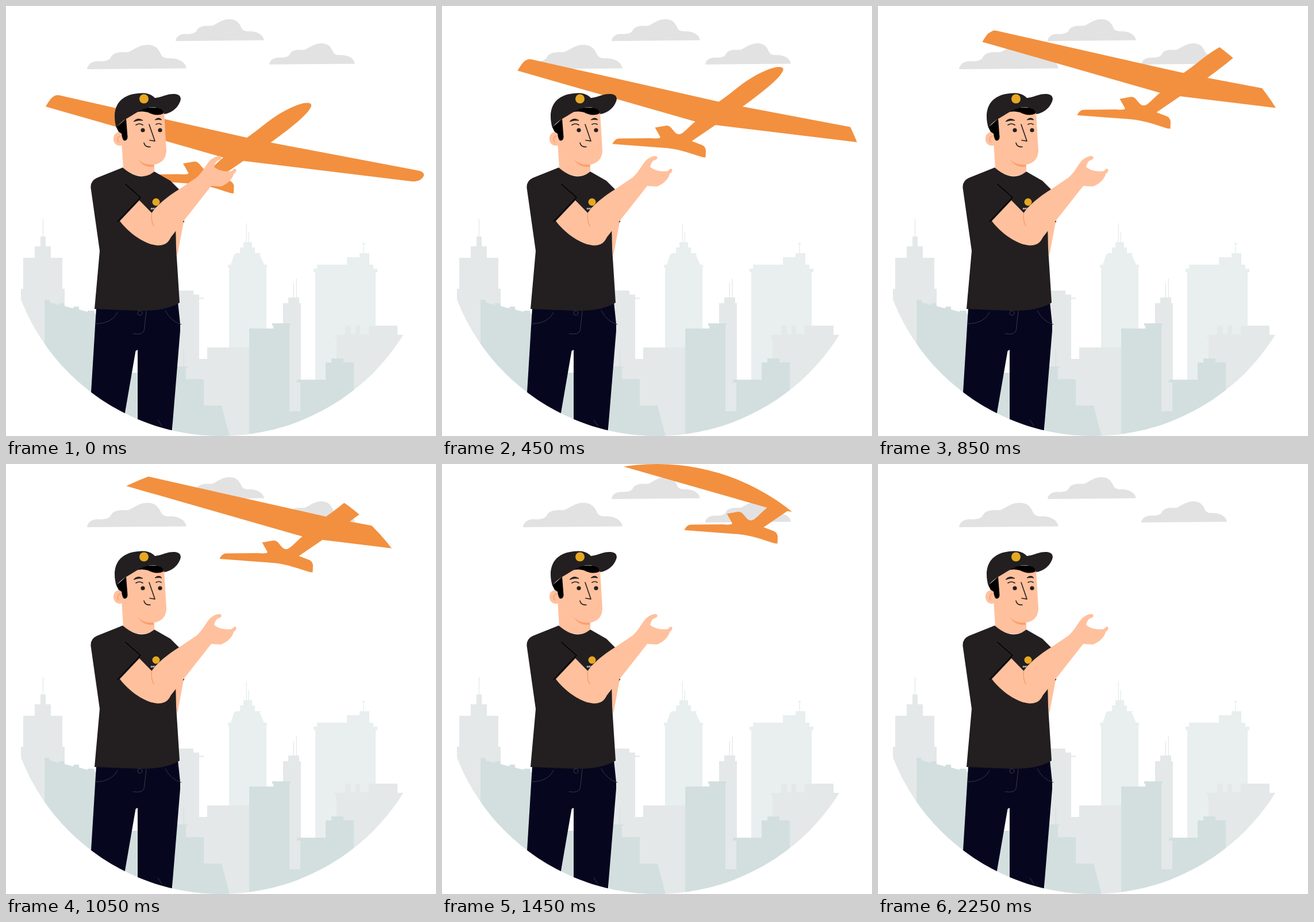
Animation, 748 px wide and 748 px high, one loop 2310 ms. Source, as an HTML page:

```html
<!DOCTYPE html>
<html lang="en">
<head>
<meta charset="utf-8">
<title>Glider launch</title>
<style>
  html, body { margin: 0; width: 100%; height: 100%; overflow: hidden; background: #fff; }
  svg { display: block; width: 100%; height: 100%; }
  .line { fill: none; stroke-linecap: round; stroke-linejoin: round; }
  .light { fill: #e8efee; }
  .mid { fill: #e4e8e8; }
  .dark { fill: #d3dfdf; }
  .cloth { fill: #231f20; }
  .skin { fill: #ffc09d; }
  .shade { fill: #fb9f6e; }
  .gold { fill: #e5a823; }
</style>
</head>
<body>
<svg viewBox="0 0 748 748" xmlns="http://www.w3.org/2000/svg">
  <defs>
    <clipPath id="stage"><circle cx="374" cy="374" r="374"/></clipPath>
    <path id="cloud" d="M141 110C142 101 149 97 158 96C171 97 181 95 183 88C190 78 203 81 213 80C222 77 230 68 245 67.5C261 67 266 76 270 85C273 90 278 91 285 91C300 91 312 97 314 108.500Z"/>
  </defs>
  <g clip-path="url(#stage)">
    <g fill="#e2e2e2">
      <use href="#cloud"/>
      <use href="#cloud" transform="translate(169.500 -37) scale(.89)"/>
      <use href="#cloud" transform="translate(336.600 7) scale(.861)"/>
    </g>

    <g id="city">
      <g class="light">
        <path d="M388 610V455H386V450H391L397 432H399V430H407V420H413V411H417.500V378H419V411H421.500V393H423V411H428V420H433V430H443V432H441L449 450H454V455H453V610Z"/>
        <path d="M538 670V463H535V457H541V450H593V437H615V430H621.300V416H622.700V430H632V450H639V457H646V463H643V670Z"/>
        <circle cx="622" cy="413.500" r="2"/>
      </g>
      <g class="mid">
        <path d="M26 748V492H30V438H50V418H60V401H63.800V371H65V401H69V418H78V438H98V492H102V748Z"/>
        <path d="M290 748V495H326V502H336V507.500H344V509.500H336V614H350V594H423V748Z"/>
        <path d="M482 748V517H491V507H499.500V482H500.800V507H504.500V474H505.800V507H510V517H513V748Z"/>
        <path d="M575 748V577H572V572H590V556H600V571H608V556H616V571H631V556H681V572H700V748Z"/>
      </g>
      <g class="dark">
        <path d="M67 748V511H75L77 516L92 520V517H101L102 522L117 526L118 523H127V528L142 532V530H153L155 537H170V748Z"/>
        <path d="M200 638H240V748H200Z"/>
        <path d="M290 748V627H308.500V597H309.700V627H316V629H313V649H344V695H375L389 748Z"/>
        <path d="M423 748V561H465V556H463V552H495V555H493V705H512V655H506V650H556V620H566V613H587V620H605V748Z"/>
      </g>
    </g>

    <path id="plane" fill="#f2903f" d="M69 175C74 167 80 155 90 155Q94 155 98 156.500L419 229C437 217 458 198 475 188C495 176 514 168 525 168.500Q532 169 531 174C527 186 505 205 460.500 237.500L716 286Q728 288 727 295C723 303 716 306 705 305L413 269.500L372 297.500L389 304Q395 306 396.500 313L396 326Q391 326 386 324C362 316 345 311 327 309.500L234 302.500Q238 293 246 293L300 292.500Q319 294 317 290L308 274L328 270.500C338 270 341 287 351 285.500C357 285 366 273 378 263.500Z"/>

    <g id="man">
      <path fill="#06061f" d="M157 525L148 672V748H200L225.500 600L229 598V748H288L303 565V553L299 515Z"/>
      <g class="line" stroke="#37374a" stroke-width="1">
        <path d="M194 533Q185 552 157 553M277 530Q287 549 305 554"/>
        <path d="M244 531L240.500 563Q239 573 221 570M264 720L271 730"/>
        <circle cx="233" cy="534" r="4"/>
      </g>

      <path class="skin" d="M294 376H309L298 434L294 420Z"/>
      <path class="skin" d="M200 220L204 283Q232 305 258 289V276Q278 272 279 252L275 184H205Z"/>
      <path class="shade" d="M229 266Q238 277 257 276V279.500Q239 282 229 266Z"/>
      <path class="skin" d="M203 222C191 215 185 226 187.500 235C190 243 197 244 203 242Z"/>
      <path class="line" stroke="#fb9f6e" stroke-width="1.500" d="M199 226Q191 229 196 237"/>
      <path d="M192 211L209 196L211.500 228Q211 235 205 234Q202 231 201 222L196 219Z"/>
      <path d="M224 185Q243 172 275 179L274 187Q262 193 247 185Q237 182 224 185Z"/>
      <path class="cloth" d="M192 212C184 184 190 153 236 151.500Q251 151 259 160C274 158 281 152 294 153Q307 155 303 166C297 181 284 187 275 188Q274 177 256 176C239 176 227 186 213 194C202 200 197 205 192 212Z"/>
      <circle class="gold" cx="240" cy="161.500" r="8"/>
      <g class="cloth">
        <circle cx="238" cy="216" r="3.600"/>
        <circle cx="268" cy="216" r="3.600"/>
        <path d="M222 201Q229 193 238 199Q230 198 222 201ZM259 198Q266 192 271 198Q266 197 259 198Z" stroke="#231f20" stroke-width="1"/>
      </g>
      <path class="line" stroke="#231f20" stroke-width="1.600" d="M226 207Q232 203 238 207M261 206Q266 203 270 206M249 206L259 235L250 233.500M240 238Q242 246 251 245"/>

      <path class="cloth" d="M203 281Q234 308 258 288L286 304L302 320L310 376L295 377L296 422L302 516Q278 531 230 530L154 527L163 426L148 320Q145 305 158 299Z"/>
      <circle class="gold" cx="261" cy="341" r="6.500"/>
      <text x="251.500" y="354" fill="#fff" font-family="Arimo, 'Liberation Sans', sans-serif" font-weight="700" font-size="5">aero</text>
      <path class="skin" d="M232 338L198 374C216 398 244 415 263 416.500C278 417 283 410 287 402L357 313L374 314C384 310 394 302 396 292Q402 288 400 284Q398 281 393 287C380 289 370 286 362 280Q365 268 371 268Q376 266 374 262Q369 259 358 266C350 271 345 286 332 298L301 319C280 332 262 347 253.500 360Z"/>
      <path class="line" stroke="#fb9f6e" stroke-width="1.500" d="M253.500 361Q252 373 257 383"/>
      <path class="line" stroke="#000" stroke-width="1.600" d="M208 310L234 333L194 375"/>
    </g>
  </g>
</svg>
<script>
  const LOOP = 2310, FIRST_STEP = 50, STEP = 100, SHIFT = 12.5;
  const plane = document.getElementById("plane");
  const start = performance.now();

  // The glider climbs at 45 degrees in even steps, ten per second.
  function draw(time) {
    const steps = Math.floor((time - FIRST_STEP) / STEP) + 1;
    const d = steps * SHIFT;
    plane.setAttribute("transform", `translate(${d} ${-d})`);
  }

  function tick(now) {
    draw(Math.max(0, now - start) % LOOP);
    requestAnimationFrame(tick);
  }

  draw(0);
  requestAnimationFrame(tick);
</script>
</body>
</html>
```
